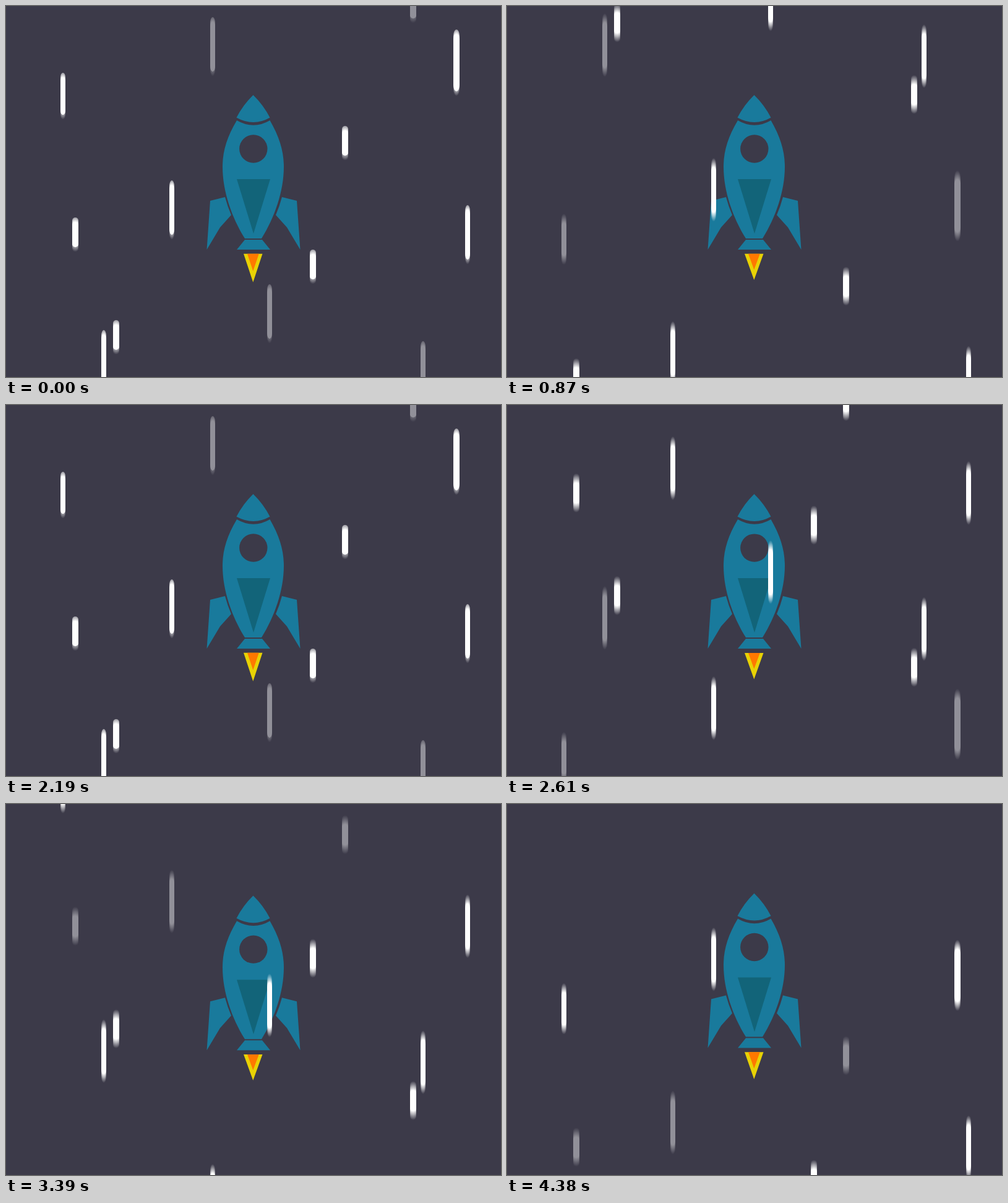
An HTML page with a canvas for the animation above (4.41 s loop, 800 px wide and 600 px high).

```html
<!DOCTYPE html>
<html lang="en">
<head>
<meta charset="utf-8">
<title>Rocket</title>
<style>
  html, body { margin: 0; width: 100%; height: 100%; overflow: hidden; background: #3c3a49; }
  svg, canvas { position: absolute; left: 0; top: 0; }
</style>
</head>
<body>
<svg width="800" height="600">
  <g id="rocket" fill="#197a9c">
    <path d="M399.5 144Q416 160 426.5 180.5Q400 195.5 372.5 180.5Q383 160 399.5 144Z"/>
    <path d="M426.5 185C442 212 449 235 449 260C449 300 434 342 413 376H386C365 342 350 300 350 260C350 235 357 212 373 185Q400 200.5 426.5 185Z"/>
    <circle cx="399.8" cy="231" r="22.7" fill="#3c3a49"/>
    <path d="M373 280H427L400 368Z" fill="#126479"/>
    <path id="fin" d="M330 315L354 309Q358 324 364 338L346 358L324.5 394Z"/>
    <use href="#fin" transform="translate(800) scale(-1 1)"/>
    <path d="M386 378H414L427 394H373Z"/>
    <g id="flame">
      <path d="M-15.3 0H15.2L0 46Z" fill="#e8d205"/>
      <path d="M-9.3 0H9.5L0 28Z" fill="#ff7800"/>
    </g>
  </g>
</svg>
<canvas id="sky" width="800" height="600"></canvas>
<script>
const FRAME_MS = 30, TOTAL = 147, CYCLE = 73;
const SPEED = 30.59;                      // pixels per frame
const PAIR_GAP = 1392, COPY_GAP = 652;    // spacing of the repeated star fields
const SAMPLES = 16, SHUTTER = 0.5;
const GROUPS = 4, DIM_FRAMES = 4, DIM = 0.42;

const SHORT = { w: 10, h: 48 }, SLIM = { w: 8, h: 68 };
const THIN = { w: 8, h: 88 }, LONG = { w: 10, h: 100 };

// Centre x, top y, size
const STARS = [
  [334, 18, THIN], [746, 322, THIN], [548, 194, SHORT], [92, 108, SLIM],
  [426, 450, THIN], [178, 508, SHORT], [112, 342, SHORT], [728, 38, LONG],
  [674, 542, THIN], [496, 394, SHORT], [268, 282, THIN], [158, 524, THIN],
  [658, 624, SHORT]
];

const ctx = document.getElementById('sky').getContext('2d');
const rocket = document.getElementById('rocket');
const flame = document.getElementById('flame');
const wave = (k, period) => Math.cos(2 * Math.PI * k / period);

// Motion blur: average the star over the open shutter
function drawStar(x, top, { w, h }, k) {
  for (let i = 0; i < SAMPLES; i++) {
    const time = Math.max(0, k + SHUTTER * ((i + 0.5) / SAMPLES - 0.5));
    ctx.beginPath();
    ctx.roundRect(x - w / 2, top + SPEED * time, w, h, { x: w / 2, y: h / 9.6 });
    ctx.fill();
  }
}

function drawSky(k) {
  const dimGroup = Math.floor((k + 1) / DIM_FRAMES) % GROUPS;
  ctx.clearRect(0, 0, 800, 600);
  ctx.globalCompositeOperation = 'lighter';
  ctx.fillStyle = '#fff';
  for (let field = 0; field < 4; field++) {
    const offset = PAIR_GAP * (field >> 1) + COPY_GAP * (field & 1);
    STARS.forEach(([x, y, size], i) => {
      ctx.globalAlpha = (i % GROUPS === dimGroup ? DIM : 1) / SAMPLES;
      drawStar(x, y - offset, size, k);
    });
  }
}

function render(now) {
  const n = Math.floor(now / FRAME_MS) % TOTAL;
  const k = n < CYCLE ? n : n - CYCLE;    // the second pass shows one extra frame
  const bob = 5 * (1 - wave(k, 14.4));
  const stretch = (44 + 2 * wave(k, 5.32)) / 46;
  drawSky(k);
  rocket.setAttribute('transform', `translate(0 ${bob})`);
  flame.setAttribute('transform', `translate(399.3 400.8) scale(1 ${stretch})`);
}

const begin = performance.now();
function tick() {
  render(performance.now() - begin);
  requestAnimationFrame(tick);
}
tick();
</script>
</body>
</html>
```
